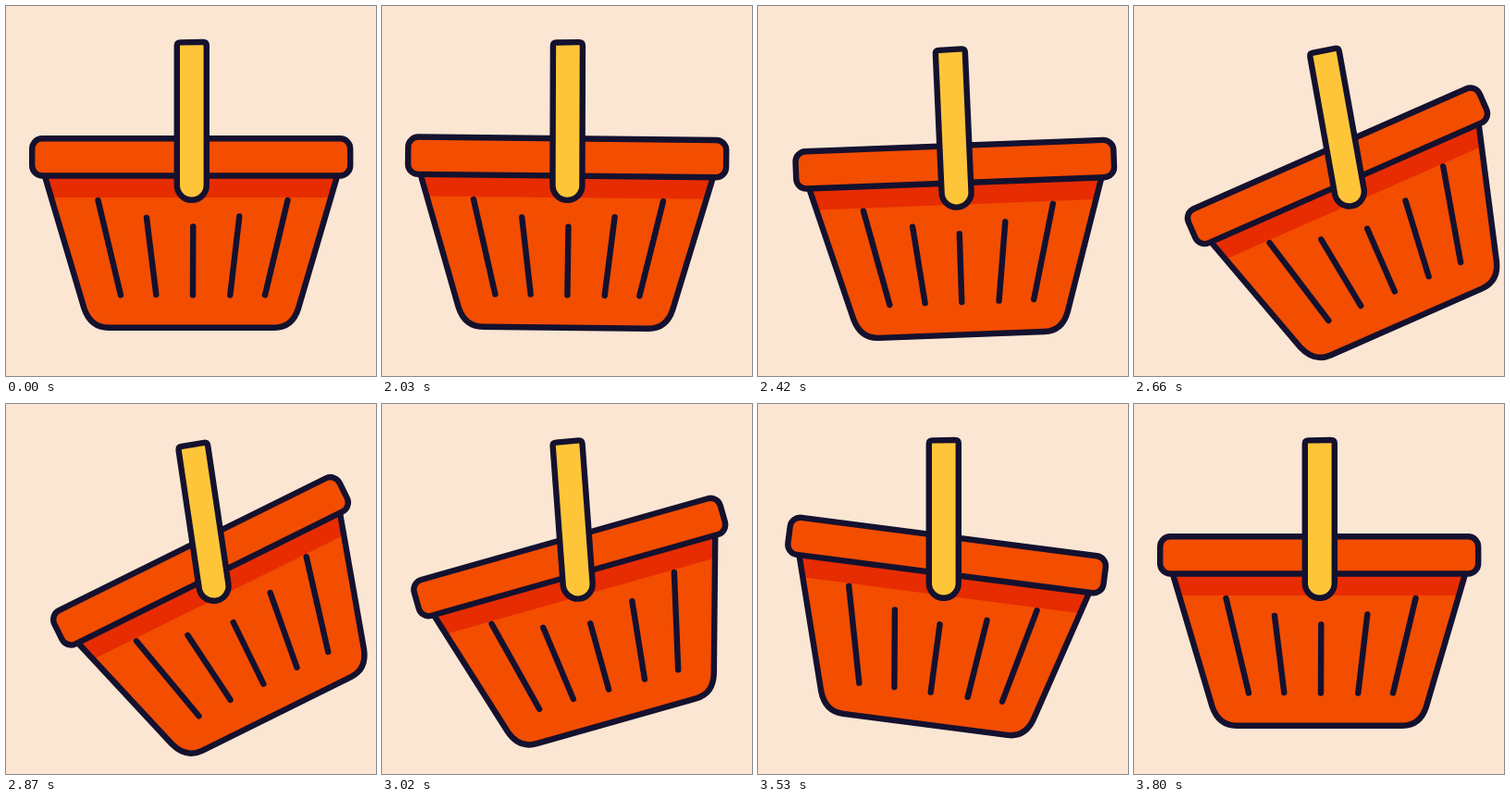
An HTML page that plays this animation: 400 px wide and 400 px high, repeating every 3830 ms.

```html
<!DOCTYPE html>
<html lang="en">
<head>
<meta charset="utf-8">
<title>Swinging basket</title>
<style>
  html, body { margin: 0; width: 100%; height: 100%; overflow: hidden; background: #fbe6d3; }
  svg { display: block; width: 100%; height: 100%; }
  .ink { stroke: #14112f; stroke-width: 6.4; stroke-linecap: round; stroke-linejoin: round; }
</style>
</head>
<body>
<svg viewBox="0 0 400 400">
  <g id="basket">
    <path fill="#f34d00" d="M42 184 L84.500 327 Q91.500 347.700 111 347.700 H290 Q309.500 347.700 316 327 L358 184 Z"/>
    <path fill="#e62c00" d="M42 184 H358 L351.200 207 H48.800 Z"/>
    <path class="ink" fill="none" d="M42 184 L84.500 327 Q91.500 347.700 111 347.700 H290 Q309.500 347.700 316 327 L358 184"/>
    <path class="ink" fill="none" d="M99.500 210 L124 312.500 M152 229 L162.300 312 M202.300 238.500 L202 312.500 M252.300 227.500 L242.300 312.500 M304.500 210 L280 312.500"/>
    <rect class="ink" x="28.200" y="143.200" width="344" height="40.300" rx="11" fill="#f34d00"/>
  </g>
  <g id="handle">
    <path class="ink" fill="#ffc539" d="M184.800 43 Q184.800 39.400 188.500 39.400 L213 39 Q216.800 39 216.800 43 V193.800 A16 16 0 0 1 184.800 193.800 Z"/>
  </g>
</svg>
<script>
  const LOOP = 3830, STEP = 30;
  const GRIP = [201, 62];       // where the handle is held
  const HINGE = [200.8, 193.8]; // where the basket hangs

  // Keys are [time, value]
  const basketTurn = [[2000, 0], [2190, 10], [2790, -28], [3390, 10], [3800, 0]];
  const handleTurn = [[2000, 0], [2190, 3], [2710, -10.5], [3260, 0]];
  const gripShift = [[2000, 0], [2560, 9.3], [3160, 0]];

  const basket = document.getElementById('basket');
  const handle = document.getElementById('handle');

  function valueAt(keys, t) {
    if (t <= keys[0][0]) return keys[0][1];
    for (let i = 1; i < keys.length; i++) {
      const [t0, v0] = keys[i - 1], [t1, v1] = keys[i];
      if (t < t1) return v0 + (v1 - v0) * (1 - Math.cos(Math.PI * (t - t0) / (t1 - t0))) / 2;
    }
    return keys[keys.length - 1][1];
  }

  function place(node, [x, y], [dx, dy], turn) {
    node.setAttribute('transform', `translate(${dx} ${dy}) rotate(${turn} ${x} ${y})`);
  }

  function draw(now) {
    const t = Math.floor((now % LOOP + 10) / STEP) * STEP - 10;
    const turn = valueAt(handleTurn, t), shift = valueAt(gripShift, t);
    place(handle, GRIP, [shift, shift], turn);

    // The basket follows the hinge at the lower end of the handle
    const a = turn * Math.PI / 180;
    const x = HINGE[0] - GRIP[0], y = HINGE[1] - GRIP[1];
    const hingeShift = [
      shift + x * Math.cos(a) - y * Math.sin(a) - x,
      shift + x * Math.sin(a) + y * Math.cos(a) - y
    ];
    place(basket, HINGE, hingeShift, valueAt(basketTurn, t));
  }

  const start = performance.now();
  function tick() {
    draw(performance.now() - start);
    requestAnimationFrame(tick);
  }
  tick();
</script>
</body>
</html>
```
